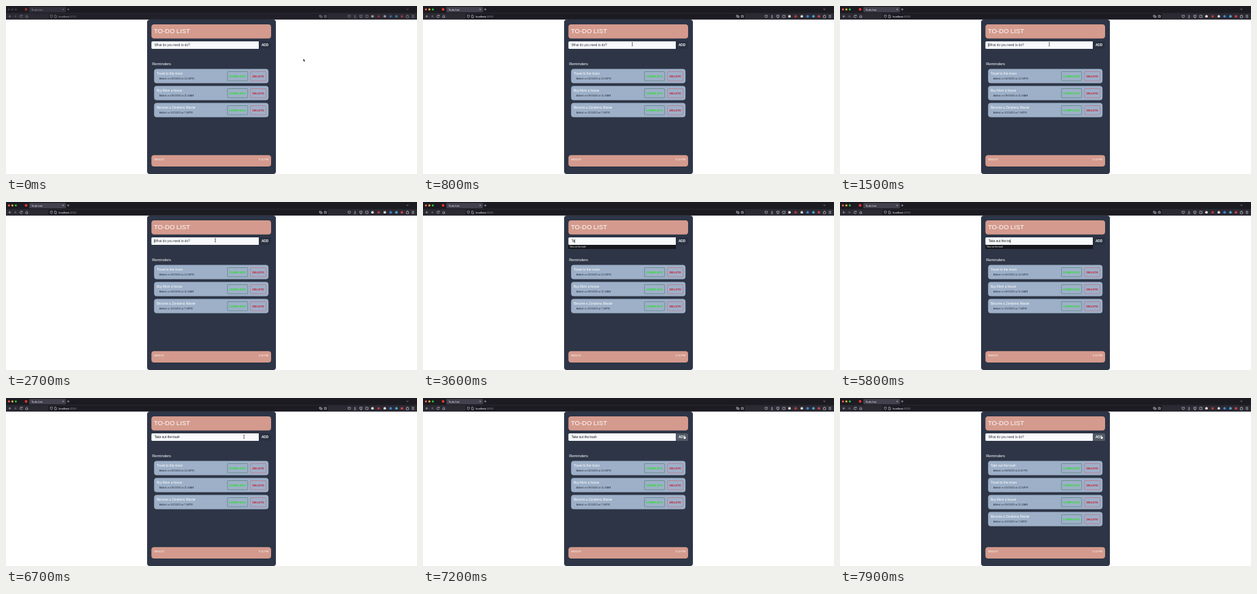
Recreate the animation shown at these times as an HTML page. Size 600 by 247 pixels, loop 8 s.

```html
<!DOCTYPE html>
<html lang="en">
<head>
<meta charset="utf-8">
<title>To-do List</title>
<style>
html, body { margin: 0; width: 100%; height: 100%; overflow: hidden; background: #fff; }
svg { display: block; width: 600px; height: 247px; }
text { font-family: "Liberation Sans", Arial, sans-serif; white-space: pre; }
.bold { font-weight: 700; }
.line { fill: none; stroke: #d6d6dc; stroke-width: .6; }
</style>
</head>
<body>
<svg viewBox="0 0 600 247">
  <rect width="600" height="20" fill="#2b2a33"/>
  <rect width="600" height="10.3" fill="#1c1b22"/>
  <g id="chrome">
    <g id="lights"></g>
    <circle cx="29.3" cy="5" r="2" fill="#e3342f"/>
    <rect x="34" y="1.2" width="53.5" height="8" rx="1.3" fill="#42414d"/>
    <text x="37" y="6.6" font-size="3.7" fill="#fbfbfe">To-do List</text>
    <path class="line" d="M82.6 4.1l1.8 1.8m0-1.8l-1.8 1.8M89.4 5h3m-1.5-1.5v3M584.8 4.2l1.2 1.2 1.2-1.2"/>
    <rect x="62" y="11.3" width="408" height="7.8" rx="1.3" fill="#1c1b22"/>
    <path class="line" d="M6 13.4L4.2 15.2 6 17M4.4 15.2h3"/>
    <path class="line" opacity=".5" d="M13.2 13.4l1.8 1.8-1.8 1.8m1.6-1.8h-3"/>
    <path class="line" d="M23.6 14.2a1.8 1.8 0 1 0 .2 1.6M23.9 13v1.4h-1.4M28.4 15.2l1.9-1.8 1.9 1.8M29 15v2h2.6v-2"/>
    <path class="line" d="M64.6 13.6l1.6-.5 1.6.5c0 2-.4 3-1.6 3.8-1.2-.8-1.6-1.8-1.6-3.8zM71 13.3h1.9l.8.9v3H71z"/>
    <text x="76.7" y="16.6" font-size="3.9" fill="#fbfbfe">localhost<tspan fill="#8f8f9b">:3000/</tspan></text>
    <path class="line" d="M457.5 13.5h2.3v2.3h-2.3zM459.8 14.8h1.6v2.2h-2.4v-1.2M466.2 13l.6 1.4 1.5.1-1.1 1 .4 1.5-1.4-.8-1.3.8.3-1.5-1.1-1 1.5-.1z"/>
    <path class="line" d="M499.3 13.7h3.5v1.5a1.75 1.75 0 0 1-3.5 0zM509.5 13v2.8m-1.2-1.2l1.2 1.2 1.2-1.2M507.8 17.2h3.4M516.4 13.5h3.4v2.6h-3.4zM517 17.3h2.4M525 13.6h3.6v3.3H525z"/>
    <g id="icons"></g>
    <path class="line" d="M584.4 14.2h1.2v-.9h1v.9h1.2v3h-3.4zM592.3 13.6h3.6m-3.6 1.6h3.6m-3.6 1.6h3.6"/>
  </g>

  <rect x="206" y="20" width="188" height="227" rx="4" fill="#2d3546"/>
  <g fill="#d49a8d">
    <rect x="212.3" y="27" width="174.7" height="20.8" rx="4"/>
    <rect x="212.3" y="219.3" width="174.7" height="16.7" rx="4"/>
  </g>
  <g fill="#fff">
    <text x="216" y="40.2" font-size="9.45">TO-DO LIST</text>
    <text x="213.2" y="87" font-size="5.75">Reminders</text>
    <text x="216.2" y="226.9" font-size="3.7">08/02/23</text>
    <text x="383" y="226.9" font-size="3.7" text-anchor="end">6:10 PM</text>
  </g>
  <path d="M213.8 52h155.4v11H213.8a1.5 1.5 0 0 1-1.5-1.5v-8a1.5 1.5 0 0 1 1.5-1.5z" fill="#f8fafc"/>
  <text id="field" x="216.7" y="59.2" font-size="4.65"></text>
  <rect id="caret" y="54.8" width=".6" height="5.5" fill="#111"/>
  <path id="add" d="M369.2 52h16.3a1.5 1.5 0 0 1 1.5 1.5v8a1.5 1.5 0 0 1-1.5 1.5h-16.3z"/>
  <text class="bold" x="378" y="59.2" font-size="4.7" fill="#fff" text-anchor="middle">ADD</text>
  <g id="list"></g>
  <g id="menu">
    <rect x="212" y="63" width="157.2" height="6" fill="#17171c"/>
    <text x="214" y="67" font-size="3" fill="#f4f4f6">Take out the trash</text>
  </g>
  <g id="mouse">
    <path id="arrow" d="M0 0v4l1-.8.7 1.5.7-.3-.6-1.5h1.2z" fill="#111" stroke="#fff" stroke-width=".3"/>
    <path id="beam" d="M-.9-2.4h1.8M0-2.4v4.8M-.9 2.4H.9" fill="none" stroke="#222" stroke-width=".6"/>
    <path id="hand" d="M-.5-2.2q.5-.6 1 0v1.6l2 .5v1.6L1.7 3H-.6L-2 .8l.5-.5 1 .7z" fill="#fff" stroke="#222" stroke-width=".35"/>
  </g>
</svg>
<script>
const $ = id => document.getElementById(id);
const show = (id, on) => $(id).setAttribute('visibility', on ? 'visible' : 'hidden');
const LOOP = 8000, ACTIVE = 800, FOCUS = 1300, MOVE = 6300, HOVER = 6950, CLICK = 7500;
const PHRASE = 'Take out the trash';
const HINT = 'What do you need to do?';
const keys = [3300, 3500, 3700, 3800, 3950, 4300, 4400, 4500, 4600,
  4850, 4950, 5050, 5200, 5400, 5550, 5700, 5900, 6000];

const items = [
  [PHRASE, '08/02/23 at 6:10 PM'],
  ['Travel to the moon', '02/24/23 at 12:34PM'],
  ['Buy Mom a house', '08/24/20 at 11:34AM'],
  ['Become a Zondemu Master', '10/24/19 at 7:34PM']
];

const button = (x, w, label, color, edge) => `
  <rect x="${x}" y="4.1" width="${w}" height="13.4" rx=".8" fill="none" stroke="${edge}" stroke-width=".6"/>
  <text class="bold" x="${x + w / 2}" y="12.3" font-size="4.35" fill="${color}" text-anchor="middle">${label}</text>`;

const row = ([title, date], i) => `<g transform="translate(0 ${92.4 + i * 25})">
  <rect x="216.2" width="167" height="21.2" rx="4" fill="#9db0c8"/>
  <text x="219.9" y="8.3" font-size="4.62" fill="#fff">${title}</text>
  <text x="223.8" y="15.8" font-size="3.68" fill="#27303f">Added on ${date}</text>
  ${button(323.3, 29.5, 'COMPLETE', '#1fe51f', '#4f7b72')}
  ${button(357, 22.6, 'DELETE', '#d01528', '#c9697a')}</g>`;

const dot = (x, y, r, color) => `<circle cx="${x}" cy="${y}" r="${r}" fill="${color}"/>`;
$('icons').innerHTML = [
  [535, '#e8e4e4'], [544, '#b23a3a'], [553, '#d8d8de'],
  [561.5, '#3d7fd0'], [570, '#4aa3c7'], [578, '#c9404a']
].map(([x, c]) => dot(x, 15.2, 1.9, c)).join('');

const ease = p => p * p * (3 - 2 * p);
const clamp = p => Math.max(0, Math.min(1, p));
const mix = (a, b, p) => a + (b - a) * p;

let lastActive, lastAdded, lastText;

function setWindow(active) {
  if (active === lastActive) return;
  lastActive = active;
  const colors = active ? ['#ff5f57', '#febc2e', '#28c840'] : Array(3).fill('#55545e');
  $('lights').innerHTML = colors.map((c, i) => dot(4.3 + i * 5, 5, 1.5, c)).join('');
  $('chrome').setAttribute('opacity', active ? 1 : .6);
}

function setList(added) {
  if (added === lastAdded) return;
  lastAdded = added;
  $('list').innerHTML = items.slice(added ? 0 : 1).map(row).join('');
}

function setField(text) {
  if (text === lastText) return;
  lastText = text;
  const field = $('field');
  field.textContent = text || HINT;
  field.setAttribute('fill', text ? '#111' : '#30343b');
  $('caret').setAttribute('x', 216.5 + (text ? field.getComputedTextLength() : -.4));
}

function caretOn(t, count) {
  if (t < FOCUS || t >= 7000) return false;
  const since = count ? keys[count - 1] : FOCUS;
  return (t - since) % 1000 < 500;
}

function setMouse(t) {
  const a = ease(clamp((t - 50) / 750)), b = ease(clamp((t - MOVE) / 750));
  const x = mix(mix(434, 305.5, a), 381.5, b);
  const y = mix(mix(77.5, 56.2, a), 57.3, b);
  $('mouse').setAttribute('transform', `translate(${x} ${y})`);
  const overField = y < 63 && x < 369, hover = t >= HOVER;
  const seen = t < keys[0] || t >= MOVE;
  show('arrow', seen && !overField && !hover);
  show('beam', seen && overField);
  show('hand', hover);
  $('add').setAttribute('fill', hover ? '#535b68' : '#293040');
}

function draw(now) {
  const t = now % LOOP;
  const added = t >= CLICK;
  const count = added ? 0 : keys.filter(k => k <= t).length;
  setWindow(t >= ACTIVE);
  setList(added);
  setField(PHRASE.slice(0, count));
  show('caret', caretOn(t, count));
  show('menu', count > 0 && count < PHRASE.length);
  setMouse(t);
}

const start = performance.now();
function tick() {
  draw(performance.now() - start);
  requestAnimationFrame(tick);
}
tick();
</script>
</body>
</html>
```
